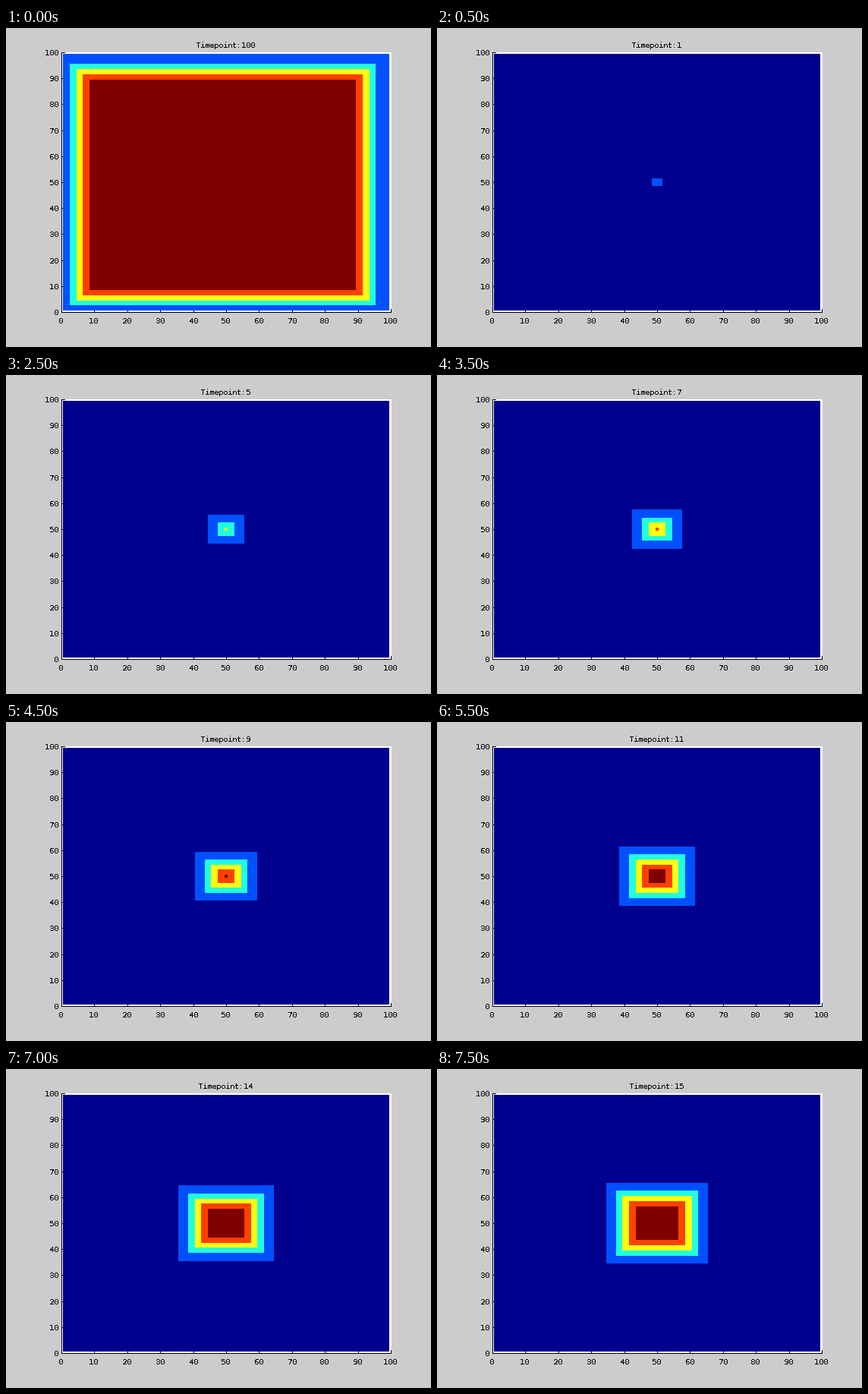
Write a matplotlib script that moves like this. It is 560x420 px and loops after 8000 ms.

```python
import matplotlib.pyplot as plt
from matplotlib.animation import FuncAnimation
from matplotlib.patches import Rectangle

W, H, DPI = 560, 420, 100
FRAMES, INTERVAL = 16, 500
LEFT, RIGHT, TOP, BOTTOM = 73, 507, 32, 374
CENTER = 50
BACKGROUND = "#00008f"
# Each level: colour and its delay behind the outer front, in steps.
LEVELS = [("#0050ff", 0), ("#20ffdf", 3), ("#ffff10", 5),
          ("#ff4000", 7), ("#800000", 9)]

plt.rcParams.update({
    "text.antialiased": False,
    "text.hinting": "native",
    "text.hinting_factor": 1,
    "font.family": "DejaVu Sans Mono",
    "font.size": 10.5 * 72 / DPI,
})

fig = plt.figure(figsize=(W / DPI, H / DPI), dpi=DPI, facecolor="#cccccc")
ax = fig.add_axes([0, 0, 1, 1])
ax.set_xlim(0, W)
ax.set_ylim(H, 0)
ax.axis("off")


def px(v):
    return round(LEFT + (RIGHT - LEFT) * v / 100)


def py(v):
    return round(BOTTOM - (BOTTOM - TOP) * v / 100)


def box(x0, y0, x1, y1, color):
    patch = Rectangle((x0, y0), x1 - x0, y1 - y0, facecolor=color,
                      linewidth=0, antialiased=False, snap=False)
    return ax.add_patch(patch)


def set_cells(patch, lo, hi):
    """Cover the square block of cells from lo to hi on both axes."""
    patch.set_bounds(px(lo), py(hi), px(hi) - px(lo), py(lo) - py(hi))


box(LEFT, TOP, RIGHT + 1, BOTTOM, "white")

for v in range(0, 101, 10):
    x, y = px(v), py(v)
    box(LEFT, y, LEFT + 5, y + 1, "black")
    box(x, BOTTOM - 4, x + 1, BOTTOM + 1, "black")
    ax.text(x - 0.5, 389, str(v), ha="center", va="baseline")
    ax.text(69, y + 4, str(v), ha="right", va="baseline")

field = box(0, 0, 1, 1, BACKGROUND)
set_cells(field, 0.5, 99.5)
blocks = [box(0, 0, 0, 0, color) for color, _ in LEVELS]

box(LEFT, TOP, LEFT + 1, BOTTOM + 1, "black")
box(LEFT, BOTTOM, RIGHT + 1, BOTTOM + 1, "black")

title = ax.text(289, 26, "", ha="center", va="baseline")


def update(i):
    step = i or 100
    title.set_text(f"Timepoint:{step}")
    for k, (block, (_, delay)) in enumerate(zip(blocks, LEVELS)):
        half = step - delay
        block.set_visible(half >= 0)
        if step < CENTER:
            set_cells(block, CENTER - half - 0.5, CENTER + half + 0.5)
        else:
            # The front has reached the walls; only the rims remain.
            set_cells(block, 0.5 + 2 * k, 99.5 - (2 * k + 2 if k else 0))
    return [title, *blocks]


anim = FuncAnimation(fig, update, frames=FRAMES, interval=INTERVAL,
                     repeat=True, repeat_delay=0, blit=False)
plt.show()
```
